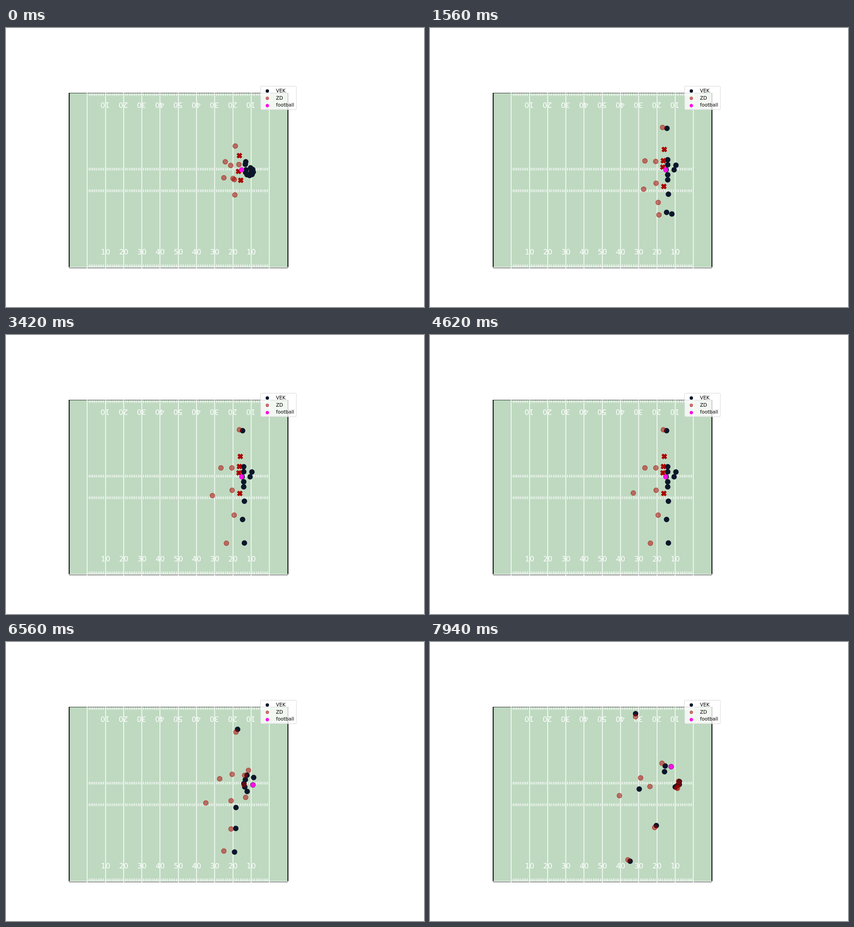
An HTML page with a canvas for the animation above (8000 ms loop, 917 by 611 pixels).

```html
<!DOCTYPE html>
<html lang="en">
<head>
<meta charset="utf-8">
<title>Play tracking</title>
<style>
  html, body { margin: 0; width: 100%; height: 100%; overflow: hidden; background: #fff; }
  canvas { display: block; width: 917px; height: 611px; }
</style>
</head>
<body>
<canvas id="stage" width="917" height="611"></canvas>
<script>
const W = 917, H = 611, LOOP = 8000;
const ctx = document.getElementById('stage').getContext('2d');
const HOME = '#0b162a', AWAY = '#aa0000', BALL = '#ff10e6', FIELD = '#bed9c0';
const FONT = '"DejaVu Sans", Verdana, sans-serif';
const LEFT = 138.3, RIGHT = 618.5, TOP = 142.5, BOTTOM = 525.5;
const YARD = 3.995, GRID = 0.764;
const BALL_SPOT = [517, 310.5];

// Phases: players walk to their spots, hold, then run after the snap
const SNAP = 5750, MID = 7100, END = 7940;
const CAUGHT = 6200, RUSH_END = 6300;

const lerp = (a, b, u) => a + (b - a) * u;
const shift = ([x, y], [dx, dy], k = 1) => [x + dx * k, y + dy * k];

// Smooth track through [time, [x, y]] keys: starts at rest, never overshoots
function track(keys) {
  const slope = (i, c) => (keys[i + 1][1][c] - keys[i][1][c]) / (keys[i + 1][0] - keys[i][0]);
  const tangent = (i, c) => {
    if (i === 0) return 0;
    if (i === keys.length - 1) return slope(i - 1, c);
    const a = slope(i - 1, c), b = slope(i, c);
    return a * b <= 0 ? 0 : 2 * a * b / (a + b);
  };
  return time => {
    const t = Math.min(time, END);
    let i = 0;
    while (i < keys.length - 2 && t >= keys[i + 1][0]) i++;
    const [t0, p] = keys[i], [t1, q] = keys[i + 1];
    const d = t1 - t0, u = (t - t0) / d, v = 1 - u;
    return [0, 1].map(c =>
      (1 + 2 * u) * v * v * p[c] + u * v * v * d * tangent(i, c)
      + u * u * (3 - 2 * u) * q[c] - u * u * v * d * tangent(i + 1, c));
  };
}

// A player walks from start to set by the time `ready`, then runs through mid to end
function player({ start, via = [], ready, set, mid, end }) {
  const at = track([[0, start], ...via, [ready, set], [SNAP, set], [MID, mid], [END, end]]);
  return { at, mid, end };
}

// A defender chases a mark after the snap, closing the gap between them
const chase = (mark, gap, walk) =>
  player({ ...walk, mid: shift(mark.mid, gap), end: shift(mark.end, gap, 0.6) });

// Spots around the huddle, counted from the center's
function huddle(k) {
  const a = (-153 - 40 * k) * Math.PI / 180;
  return [534 + 8.5 * Math.cos(a), 314.5 + 8.5 * Math.sin(a)];
}

// Linemen: an even row before the snap, a cup around the passer after it
function lineman(i, start, end) {
  return player({
    start, end, ready: 800,
    set: [i ? 521.5 : 518, 310.5 + 11 * i],
    mid: [524 + 3 * i * i, 309 + 6.5 * i]
  });
}
const leftTackle = lineman(-2, [525, 298.5], [547, 312]);
const leftGuard = lineman(-1, huddle(7), [516, 271.5]);
const center = lineman(0, huddle(0), [514.5, 284]);
const rightGuard = lineman(1, huddle(1), [538, 317.5]);
const rightTackle = lineman(2, huddle(2), [543, 314]);

const passer = player({ start: huddle(5), ready: 1400, set: [535.5, 310.5], mid: [545, 314.5], end: [529, 273] });
const back = player({ start: huddle(6), ready: 1800, set: [539.5, 300], mid: [546, 295], end: [547, 305.5] });

const wideTop = player({ start: [526, 293], ready: 2000, set: [519, 209.5], mid: [494, 174.5], end: [451, 157] });
const tightEnd = player({ start: huddle(3), ready: 1600, set: [523, 364], mid: [485.5, 360], end: [459, 322] });
const slot = player({ start: [538, 315], ready: 1600, set: [519, 404], mid: [496, 410.5], end: [496.5, 402] });
const wideLow = player({
  start: huddle(4), via: [[900, [536, 367]]], ready: 2700,
  set: [523, 455.5], mid: [478, 465.5], end: [439, 480]
});

const home = [leftTackle, leftGuard, center, rightGuard, rightTackle,
  passer, back, wideTop, tightEnd, slot, wideLow];

const away = [
  // Man coverage
  chase(wideTop, [0, 11], { start: [503, 258.5], ready: 2190, set: [512, 207.5] }),
  chase(slot, [-6, 7], { start: [501, 332], ready: 2190, set: [500.5, 394.5] }),
  chase(wideLow, [-8, -5], {
    start: [502, 365.5], via: [[2280, [502.5, 433.5]]], ready: 3400, set: [483.5, 456]
  }),
  // Zone coverage
  player({ start: [481, 293], ready: 1500, set: [471.5, 291], mid: [466, 304], end: [462, 297.5] }),
  player({ start: [493, 301], ready: 2000, set: [495.5, 291], mid: [497, 287.5], end: [509, 265.5] }),
  player({
    start: [478, 328], via: [[2100, [464.5, 358]]], ready: 4700,
    set: [446, 346], mid: [430, 356], end: [415.5, 336.5]
  }),
  player({ start: [498, 329.5], ready: 1500, set: [496, 340], mid: [491, 351.5], end: [482.5, 316.5] })
];

// Rushers carry a cross from the time `from` until the rush is over
const rush = (from, mark, gap, walk) => ({ from, ...chase(mark, gap, walk) });
const rushers = [
  rush(0, back, [-3, -1], { start: [512, 279.5], ready: 1000, set: [514, 266] }),
  rush(480, leftTackle, [-2, 1], { start: [511, 299], ready: 2280, set: [512, 288] }),
  rush(0, rightGuard, [5, 3], { start: [510, 314], ready: 2280, set: [511, 302] }),
  rush(0, rightTackle, [0, 11], { start: [515, 333.5], ready: 1500, set: [513, 347] })
];

// The ball rests on its spot, flies back at the snap and stays with the passer
function ballAt(t) {
  const u = Math.min(1, Math.max(0, (t - SNAP) / (CAUGHT - SNAP)));
  const hands = passer.at(t);
  return BALL_SPOT.map((v, c) => lerp(v, hands[c], u));
}

function dot([x, y], color, r = 5.3) {
  ctx.fillStyle = ctx.strokeStyle = color;
  ctx.lineWidth = 1.4;
  ctx.beginPath();
  ctx.arc(x, y, r, 0, 2 * Math.PI);
  ctx.fill();
  ctx.stroke();
}

function faintDot(pos, r) {
  ctx.globalAlpha = 0.5;
  dot(pos, AWAY, r);
  ctx.globalAlpha = 1;
}

function cross([x, y]) {
  const s = 2.65;
  ctx.save();
  ctx.translate(x, y);
  ctx.fillStyle = ctx.strokeStyle = AWAY;
  ctx.lineWidth = 1.4;
  ctx.beginPath();
  for (let k = 0; k < 4; k++) {
    ctx.lineTo(-s, -2 * s);
    ctx.lineTo(0, -s);
    ctx.lineTo(s, -2 * s);
    ctx.rotate(Math.PI / 2);
  }
  ctx.closePath();
  ctx.fill();
  ctx.stroke();
  ctx.restore();
}

function line(x1, y1, x2, y2, color, width) {
  ctx.strokeStyle = color;
  ctx.lineWidth = width;
  ctx.beginPath();
  ctx.moveTo(x1, y1);
  ctx.lineTo(x2, y2);
  ctx.stroke();
}

function number(text, x, y, turn) {
  ctx.save();
  ctx.translate(x, y);
  ctx.rotate(turn);
  ctx.fillText(text, 0, 5.8);
  ctx.restore();
}

const yardX = yd => LEFT + yd * YARD;
const snapX = x => Math.round(x / GRID) * GRID;

function drawField() {
  ctx.fillStyle = '#fff';
  ctx.fillRect(0, 0, W, H);
  ctx.fillStyle = FIELD;
  ctx.fillRect(LEFT, TOP, RIGHT - LEFT, 523.7 - TOP);
  line(LEFT, TOP, RIGHT, TOP, '#000', 0.8);
  line(LEFT, BOTTOM, RIGHT, BOTTOM, '#000', 0.8);
  for (let yd = 11; yd < 110; yd++) {
    const x = snapX(yardX(yd));
    for (const y of [142.7, 306.2, 353.6, 518])
      line(x, y, x, y + 5.8, '#fff', 1.53);
  }
  ctx.font = '15.9px ' + FONT;
  ctx.textAlign = 'center';
  ctx.textBaseline = 'alphabetic';
  for (let i = 1; i <= 11; i++) {
    const x = yardX(i * 10);
    line(snapX(x), TOP - 0.5, snapX(x), BOTTOM + 0.5, '#fff', 1.53);
    if (i === 1 || i === 11) continue;
    const label = String(Math.min(i - 1, 11 - i) * 10);
    ctx.fillStyle = '#fff';
    number(label, x + 0.2, 490.3, 0);
    number(label, x - 0.8, 168.6, Math.PI);
  }
  for (const x of [138.6, RIGHT]) line(x, TOP - 0.5, x, 523.7, '#000', 2);
}

function drawLegend() {
  ctx.beginPath();
  ctx.roundRect(558.3, 127.5, 78.7, 51.5, 2.2);
  ctx.globalAlpha = 0.8;
  ctx.fillStyle = '#fff';
  ctx.fill();
  ctx.strokeStyle = '#ccc';
  ctx.lineWidth = 1;
  ctx.stroke();
  ctx.globalAlpha = 1;
  dot([573.3, 138], HOME, 3);
  faintDot([573.3, 154], 3);
  dot([573.3, 170], BALL, 3);
  ctx.fillStyle = '#000';
  ctx.font = '10.6px ' + FONT;
  ctx.textAlign = 'left';
  ['VEK', 'ZD', 'football'].forEach((s, i) => ctx.fillText(s, 592.2, 141.2 + i * 15.6));
}

// Positions update in 60 ms steps, with one longer hold
function stepTime(t) {
  if (t >= 4920 && t < 5110) return 4920;
  return t < 4920 ? Math.floor(t / 60) * 60 : Math.floor((t - 20) / 60) * 60 + 20;
}

function draw(t) {
  const marked = r => t >= r.from && t < RUSH_END;
  drawField();
  for (const p of home) dot(p.at(t), HOME);
  for (const p of away) faintDot(p.at(t));
  for (const r of rushers) if (!marked(r)) faintDot(r.at(t));
  for (const r of rushers) if (marked(r)) cross(r.at(t));
  dot(ballAt(t), BALL, 4.8);
  drawLegend();
}

const origin = performance.now();
function frame() {
  draw(stepTime((performance.now() - origin) % LOOP));
  requestAnimationFrame(frame);
}
frame();
</script>
</body>
</html>
```
